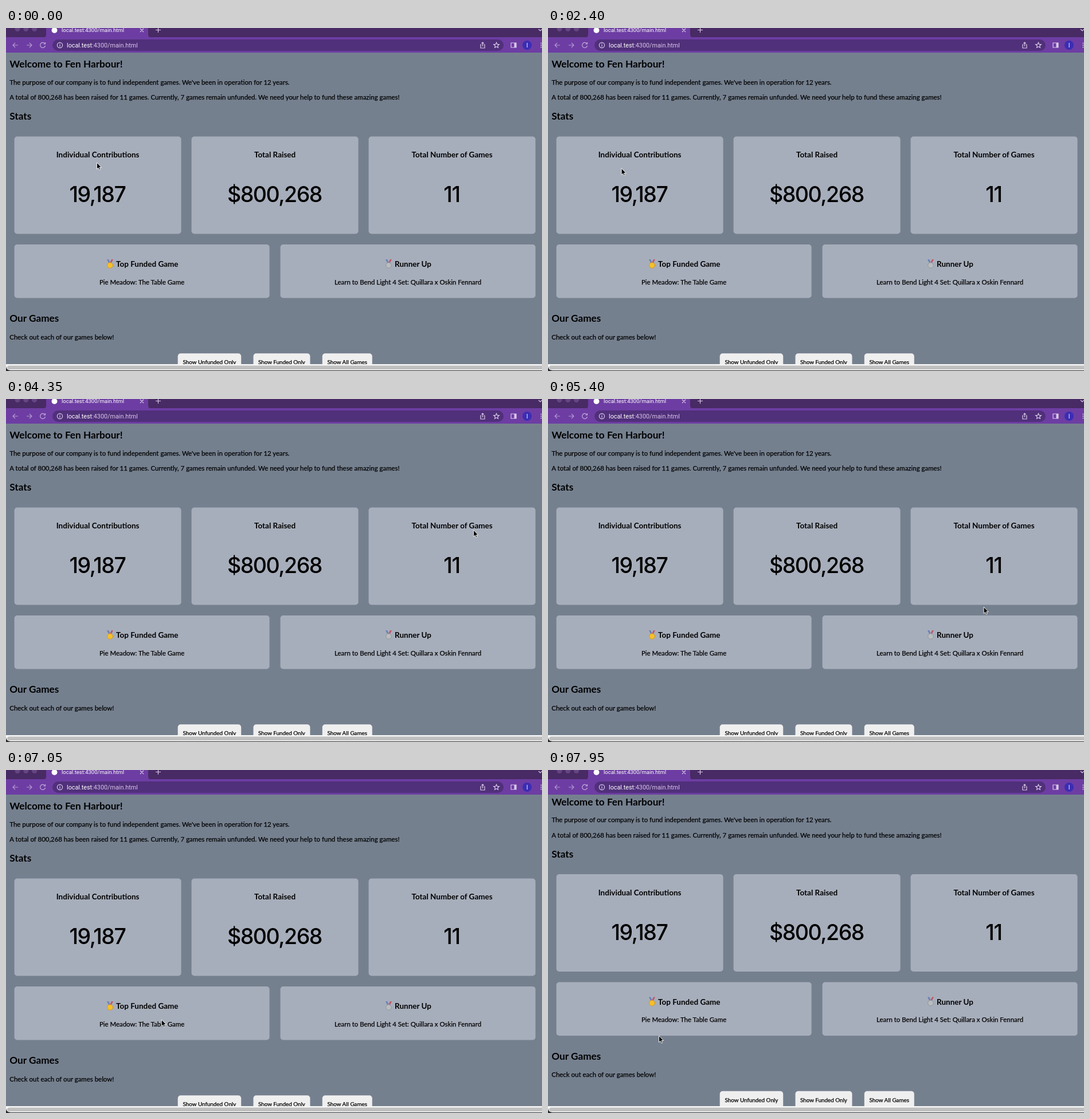
Write an HTML page that moves like this. It is 935 by 599 pixels and loops after 8000 ms.

```html
<!DOCTYPE html>
<html lang="en">
<head>
<meta charset="utf-8">
<title>Games dashboard</title>
<style>
  html, body { margin: 0; width: 100%; height: 100%; overflow: hidden; background: #75808f; }
  svg { display: block; width: 935px; height: 599px; }
  text { font-family: Lato, sans-serif; font-size: 11.44px; }
  #page text { stroke: #000; stroke-width: .25px; }
  #page .h2 { font-size: 17.2px; font-weight: 700; stroke: none; }
  #page .h3 { font-size: 13.5px; font-weight: 700; stroke: none; }
  #page .big { font-family: Inter, sans-serif; font-size: 37.5px; font-weight: 500; letter-spacing: -1.5px; stroke: none; }
  #page .btn { font-size: 9.85px; }
  .mid { text-anchor: middle; }
  .ui, .ui tspan { font-family: Roboto, sans-serif; fill: #fff; }
  .line { fill: none; stroke: #d9c9ea; stroke-width: 1.2; }
  .dots { fill: none; stroke-linecap: round; }
</style>
</head>
<body>
<svg viewBox="0 0 935 599">
  <defs>
    <clipPath id="view"><rect y="43" width="935" height="544"/></clipPath>
    <g id="ribbon">
      <path d="M-5.5-9h3l3 6h-3z" fill="#6b7fb5"/>
      <path d="M5.5-9h-3l-3 6h3z" fill="#c2566b"/>
    </g>
  </defs>

  <rect width="935" height="599" fill="#75808f"/>
  <g clip-path="url(#view)"><g id="page"></g></g>

  <!-- browser bar -->
  <rect width="935" height="17" fill="#482a64"/>
  <rect y="16" width="935" height="27" fill="#6d3da3"/>
  <path d="M64 17q6 0 6-6V0H248v11q0 6 6 6z" fill="#6d3da3"/>
  <path class="dots" d="M20 1.5h30" stroke="#664583" stroke-width="9" stroke-dasharray="0 14.8"/>
  <circle cx="84.5" cy="4" r="5" fill="#fff"/>
  <text class="ui" x="97" y="7" style="font-size:9.5px">local.test:4300/main.html</text>
  <path class="line" d="M234 1l6 6m0-6l-6 6M261 3.5h9M265.5-1v9M929 2l3 3 3-3"/>
  <rect x="81" y="20" width="787" height="20" rx="10" fill="#50307a"/>
  <path class="line" stroke-opacity=".65" d="M21 30h-9m4-4l-4 4 4 4M36 30h9m-4-4l4 4-4 4"/>
  <path class="line" stroke-opacity=".8" d="M67.5 27a4.5 4.5 0 1 0 1 4M68.5 25v3h-3"/>
  <circle class="line" cx="94" cy="30" r="4.6"/>
  <path class="line" d="M94 29.3v3.5M94 27v1.2"/>
  <text class="ui" x="106" y="34" style="font-size:10.8px">local.test<tspan style="fill:#d6c6e6">:4300/main.html</tspan></text>
  <path class="line" d="M829.5 29h-1.5v6h7v-6h-1.5M831.5 32v-7m-2 2l2-2 2 2"/>
  <path id="star" class="line"/>
  <path class="line" d="M881 26h9v8h-9z"/>
  <path d="M886.5 26h3.5v8h-3.5z" fill="#d9c9ea"/>
  <circle cx="909" cy="30" r="8" fill="#3b2db3"/>
  <text class="ui mid" x="909" y="33.5" style="font-size:10px">I</text>
  <path class="dots" d="M933.5 26.5v7.1" stroke="#d9c9ea" stroke-width="2" stroke-dasharray="0 3.5"/>

  <!-- scrollbar -->
  <rect y="587" width="935" height="12" fill="#272a30"/>
  <path d="M0 587H935V598H8q-7 0-8-7z" fill="#f7f7f7"/>
  <rect x="2" y="589.5" width="940" height="7" rx="3.5" fill="#c0c0c0"/>

  <path id="cursor" d="M0 0V11.5L2.6 9.2 4.3 13 6.2 12.2 4.5 8.5H8Z" stroke="#fff" stroke-width=".9"/>
</svg>

<script>
const $ = id => document.getElementById(id);
const add = markup => $('page').insertAdjacentHTML('beforeend', markup);
const text = (x, y, str, cls = '') => add(`<text x="${x}" y="${y}" class="${cls}">${str}</text>`);
const box = (x, y, w, h, fill = '#a7aebb') =>
  add(`<rect x="${x}" y="${y}" width="${w}" height="${h}" rx="5" fill="${fill}"/>`);
const medal = (x, fill, rim) => add(`<g transform="translate(${x} 413)"><use href="#ribbon"/>
  <circle cy="1.5" r="4.8" fill="${fill}" stroke="${rim}"/></g>`);

const starPoint = (_, i) => {
  const r = i % 2 ? 2.3 : 5, a = (i / 5 - 0.5) * Math.PI;
  return [855.5 + r * Math.cos(a), 30.3 + r * Math.sin(a)];
};
$('star').setAttribute('d', `M${Array.from({ length: 10 }, starPoint).join('L')}Z`);

const LEFT = 6.3;
text(LEFT, 69, 'Welcome to Fen Harbour!', 'h2');
text(LEFT, 98.6, "The purpose of our company is to fund independent games. We've been in operation for 12 years.");
text(LEFT, 125, 'A total of 800,268 has been raised for 11 games. Currently, 7 games remain unfunded. We need your help to fund these amazing games!');
text(LEFT, 160, 'Stats', 'h2');

[
  ['Individual Contributions', '19,187'],
  ['Total Raised', '$800,268'],
  ['Total Number of Games', '11']
].forEach(([title, value], i) => {
  const x = 14.6 + 309 * i;
  box(x, 189.5, 291, 170);
  text(x + 145.5, 226, title, 'h3 mid');
  text(x + 144.8, 304, value, 'big mid');
});

[
  ['Top Funded Game', 'Pie Meadow: The Table Game', 192, '#f5c02c', '#d9981c'],
  ['Runner Up', 'Learn to Bend Light 4 Set: Quillara x Oskin Fennard', 678, '#b9bdc0', '#8f959a']
].forEach(([title, game, titleX, fill, rim], i) => {
  const x = 14.6 + 464 * i;
  box(x, 378, 445, 93.5);
  medal(titleX - 10.5, fill, rim);
  text(titleX, 417, title, 'h3');
  text(x + 222.5, 447.6, game, 'mid');
});

text(LEFT, 513, 'Our Games', 'h2');
text(LEFT, 543.5, 'Check out each of our games below!');
let buttonX = 299.7;
for (const [label, width] of [['Show Unfunded Only', 110.5], ['Show Funded Only', 99], ['Show All Games', 87]]) {
  box(buttonX, 568.3, width, 30, '#efefef');
  text(buttonX + width / 2, 587, label, 'btn mid');
  buttonX += width + 21.3;
}

// Each glide eases the pointer to a new spot; it rests in between.
const LOOP = 8000, STEP = 150;
const home = [158.5, 235];
const glides = [
  { from: 150, to: 450, at: [156, 229] },
  { from: 750, to: 1050, at: [172, 238] },
  { from: 1050, to: 1500, at: [98, 243] },
  { from: 1500, to: 1950, at: [196, 256] },
  { from: 1950, to: 2100, at: [122, 245] },
  { from: 2355, to: 3000, at: [561, 240] },
  { from: 3600, to: 3900, at: [452, 266] },
  { from: 3900, to: 4500, at: [883, 222] },
  { from: 4500, to: 4650, at: [785, 230] },
  { from: 4650, to: 5700, at: [754, 396] },
  { from: 5700, to: 6300, at: [700.5, 428] },
  { from: 6300, to: 6750, at: [308, 425] },
  { from: 6750, to: 7500, at: [204, 456] },
  { from: 7500, to: 7800, at: [221, 458] },
  { from: 7800, to: 7950, at: [193.5, 464] }
];

const smooth = k => k * k * (3 - 2 * k);
const clamp = k => Math.min(1, Math.max(0, k));

function pointerAt(t) {
  return glides.reduce((pos, { from, to, at }) => {
    const k = smooth(clamp((t - from) / (to - from)));
    return pos.map((v, i) => v + (at[i] - v) * k);
  }, home);
}

// The screen refreshes once per STEP; the page scrolls on the last one.
function draw(now) {
  const t = Math.floor((now % LOOP) / STEP) * STEP;
  $('cursor').setAttribute('transform', `translate(${pointerAt(t)})`);
  $('page').setAttribute('transform', `translate(0 ${t >= 7950 ? -7.5 : 0})`);
}

const start = performance.now();
(function tick() {
  draw(performance.now() - start);
  requestAnimationFrame(tick);
})();
</script>
</body>
</html>
```
